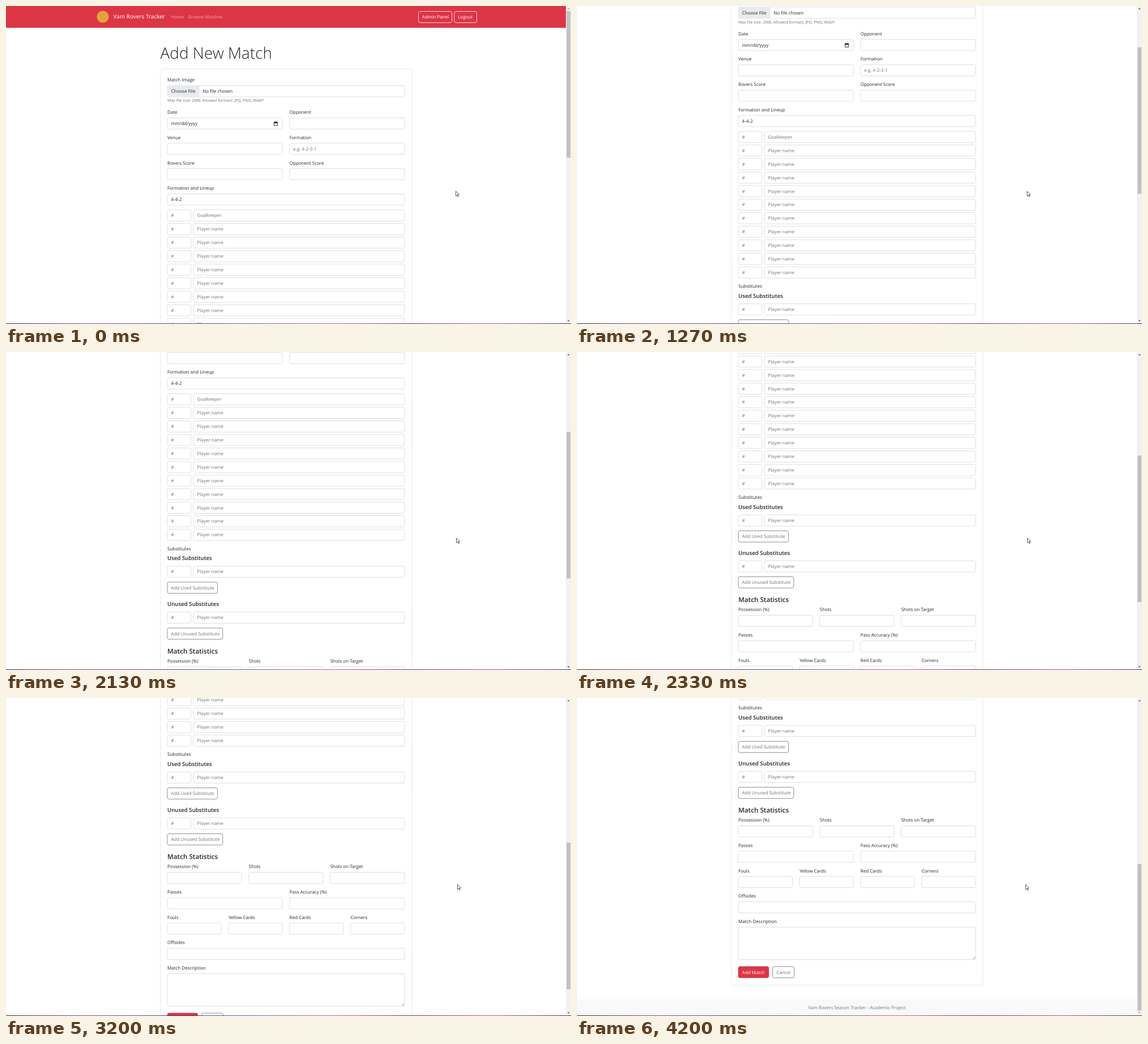
An HTML page with a canvas that plays this animation: 998 by 561 pixels, repeating every 5.2 s.

```html
<!DOCTYPE html>
<html lang="en">
<head>
<meta charset="utf-8">
<title>Add New Match</title>
<style>
html, body { margin: 0; width: 100%; height: 100%; overflow: hidden; background: #fff; }
canvas { display: block; }
</style>
</head>
<body>
<canvas id="stage" width="998" height="561"></canvas>
<script>
const ctx = document.getElementById('stage').getContext('2d');
const LOOP = 5200, STEP = 200 / 3;
const VIEW_W = 989, VIEW_H = 560, MAX_SCROLL = 615.5;
const LEFT = 285, WIDTH = 419, GAP = 12.5, BOX_H = 19.8;
const INK = '#212529', MUTED = '#6c757d', LINE = '#d3d7dc', RED = '#dc3545';

// Wheel notches: start times of each eased scroll
const NOTCH = 69.2, NOTCH_MS = 200;
const NOTCHES = [534, 1067, 1524, 1970, 2116, 2283, 2449, 3108, 3570];

// Pointer: time, x, y
const POINTER = [
  [0, 794.6, 326.6], [400, 795.2, 326.9], [2000, 795.7, 328.2],
  [2470, 796.1, 329], [2930, 797.5, 329], [4200, 792.5, 329.3]
];
const ARROW = [[0, 0], [0, 16.5], [3.8, 13], [6.3, 18.6], [8.7, 17.5], [6.3, 12], [11.5, 12]];

function scrollAt(time) {
  let y = 0;
  for (const start of NOTCHES) {
    const size = Math.min(NOTCH, MAX_SCROLL - y);
    const x = Math.min(1, Math.max(0, (time - start) / NOTCH_MS));
    y += size * (1 - (1 - x) ** 2);
  }
  return y;
}

function text(str, x, cy, color = INK, size = 8, weight = 400) {
  ctx.font = `${weight} ${size}px "Open Sans", "Noto Sans", sans-serif`;
  ctx.fillStyle = color;
  ctx.fillText(str, x, cy + size * 0.355);
}

function frame(x, y, w, h, stroke, fill, r = 3) {
  ctx.beginPath();
  ctx.roundRect(x, y, w, h, r);
  if (fill) { ctx.fillStyle = fill; ctx.fill(); }
  if (stroke) { ctx.strokeStyle = stroke; ctx.lineWidth = 0.8; ctx.stroke(); }
}

function poly(points, fill) {
  ctx.beginPath();
  points.forEach(([x, y]) => ctx.lineTo(x, y));
  ctx.closePath();
  ctx.fillStyle = fill;
  ctx.fill();
}

function input(x, cy, w, str, color = MUTED) {
  frame(x, cy - BOX_H / 2, w, BOX_H, LINE, '#fff');
  if (str) text(str, x + 6.6, cy, color);
}

function button(str, x, cy, w, color, border = color, fill) {
  frame(x, cy - BOX_H / 2, w, BOX_H, border, fill);
  text(str, x + 6.6, cy, color);
}

// A row of equal columns, each a label above an input
function fields(labels, cy, hints = []) {
  const pitch = (WIDTH + GAP) / labels.length;
  labels.forEach((label, i) => {
    const x = LEFT + i * pitch;
    text(label, x, cy);
    input(x, cy + 19.9, pitch - GAP, ...(hints[i] || []));
  });
}

function player(cy, hint = 'Player name') {
  input(LEFT, cy, 41.8, '#');
  input(331, cy, 373, hint);
}

function navbar() {
  ctx.fillStyle = RED;
  ctx.fillRect(0, 0, VIEW_W, 38.5);
  ctx.beginPath();
  ctx.arc(171, 19, 10.5, 0, Math.PI * 2);
  ctx.fillStyle = '#dfa53a';
  ctx.fill();
  text('Vam Rovers Tracker', 189.6, 18.6, '#fff', 10);
  text('Home', 291.5, 19.6, 'rgba(255,255,255,.57)');
  text('Browse Matches', 322, 19.6, 'rgba(255,255,255,.57)');
  button('Admin Panel', 728.5, 19.5, 59, '#fff');
  button('Logout', 791.8, 19.5, 39.8, '#fff');
}

function fileInput() {
  text('Match Image', LEFT, 130);
  input(LEFT, 150.2, WIDTH);
  frame(LEFT + 0.4, 140.7, 55.6, 19, null, '#e9ecef', [3, 0, 0, 3]);
  ctx.fillStyle = LINE;
  ctx.fillRect(340.6, 140.5, 0.7, 19.4);
  text('Choose File', 291.7, 150.2);
  text('No file chosen', 347.2, 150.2);
  text('Max file size: 2MB. Allowed formats: JPG, PNG, WebP', LEFT, 167, MUTED, 7);
}

function calendar(x, y) {
  ctx.strokeStyle = ctx.fillStyle = '#111';
  ctx.lineWidth = 0.8;
  ctx.strokeRect(x, y, 6, 6);
  ctx.fillRect(x, y, 6, 1.9);
  ctx.fillRect(x + 0.8, y - 0.9, 0.9, 1);
  ctx.fillRect(x + 4.3, y - 0.9, 0.9, 1);
}

function description() {
  text('Match Description', LEFT, 1009.5);
  frame(LEFT, 1019.8, WIDTH, 57.2, LINE, '#fff');
  ctx.strokeStyle = '#777';
  ctx.lineWidth = 0.6;
  ctx.beginPath();
  for (const d of [2, 4.2]) {
    ctx.moveTo(703.4 - d, 1076.2);
    ctx.lineTo(703.4, 1076.2 - d);
  }
  ctx.stroke();
}

function page() {
  navbar();
  text('Add New Match', 272.6, 82.6, INK, 27.9, 300);
  frame(272.8, 111, 444, 1011, '#e2e3e5', '#fff');

  fileInput();
  fields(['Date', 'Opponent'], 187.4, [['mm/dd/yyyy', INK]]);
  calendar(473.6, 204.8);
  fields(['Venue', 'Formation'], 232, [null, ['e.g. 4-2-3-1']]);
  fields(['Rovers Score', 'Opponent Score'], 276.7);
  fields(['Formation and Lineup'], 321.4, [['4-4-2', INK]]);
  for (let i = 0; i < 11; i++) player(369.5 + i * 23.9, i ? undefined : 'Goalkeeper');

  text('Substitutes', LEFT, 633);
  text('Used Substitutes', LEFT, 650, INK, 9.7, 600);
  player(673.6);
  button('Add Used Substitute', LEFT, 701.8, 88.6, MUTED);
  text('Unused Substitutes', LEFT, 731, INK, 9.7, 600);
  player(754.6);
  button('Add Unused Substitute', LEFT, 782.8, 97.8, MUTED);

  text('Match Statistics', LEFT, 813.4, INK, 11.7, 600);
  fields(['Possession (%)', 'Shots', 'Shots on Target'], 830.9);
  fields(['Passes', 'Pass Accuracy (%)'], 875.6);
  fields(['Fouls', 'Yellow Cards', 'Red Cards', 'Corners'], 920.2);
  fields(['Offsides'], 964.9);
  description();
  button('Add Match', LEFT, 1099.2, 53.8, '#fff', RED, RED);
  button('Cancel', 345.6, 1099.2, 38, MUTED);

  ctx.fillStyle = '#f8f9fa';
  ctx.fillRect(0, 1147, VIEW_W, 30);
  ctx.textAlign = 'center';
  text('Vam Rovers Season Tracker - Academic Project', 494.6, 1161.6, MUTED);
  ctx.textAlign = 'left';
}

function scrollbar(y) {
  ctx.fillStyle = '#f1f1f1';
  ctx.fillRect(VIEW_W, 0, 9, VIEW_H);
  ctx.fillStyle = '#c1c1c1';
  ctx.fillRect(990.2, 9 + y * 0.4614, 6.8, 258.5);
  const arrow = (cy, dir, on) =>
    poly([[991.5, cy + dir], [995.7, cy + dir], [993.6, cy - dir]], on ? '#505050' : '#a3a3a3');
  arrow(4.7, 1.1, y > 0);
  arrow(555.7, -1.1, y < MAX_SCROLL - 0.1);
}

function pointer(time) {
  const [, x, y] = POINTER.filter(p => p[0] <= time + 4).pop();
  poly(ARROW.map(([dx, dy]) => [x + dx * 0.52, y + dy * 0.52]), '#fff');
  ctx.strokeStyle = '#111';
  ctx.lineWidth = 0.7;
  ctx.stroke();
}

// Sliver of desktop below the window
const edge = ctx.createLinearGradient(0, 0, 998, 0);
['#3b2238', '#8a4a78', '#52407e', '#6d5a9e', '#b765a4', '#6a2f5c', '#a8569a', '#40304f']
  .forEach((color, i, all) => edge.addColorStop(i / (all.length - 1), color));

function draw(now) {
  const time = Math.floor((now % LOOP + 3.4) / STEP) * STEP;
  const y = scrollAt(time);
  ctx.textRendering = 'geometricPrecision';
  ctx.fillStyle = '#fff';
  ctx.fillRect(0, 0, 998, 561);
  ctx.save();
  ctx.translate(0, -y);
  page();
  ctx.restore();
  scrollbar(y);
  ctx.fillStyle = edge;
  ctx.fillRect(0, VIEW_H, 998, 1);
  pointer(time);
}

const begin = performance.now();
function tick() {
  draw(performance.now() - begin);
  requestAnimationFrame(tick);
}
tick();
</script>
</body>
</html>
```
